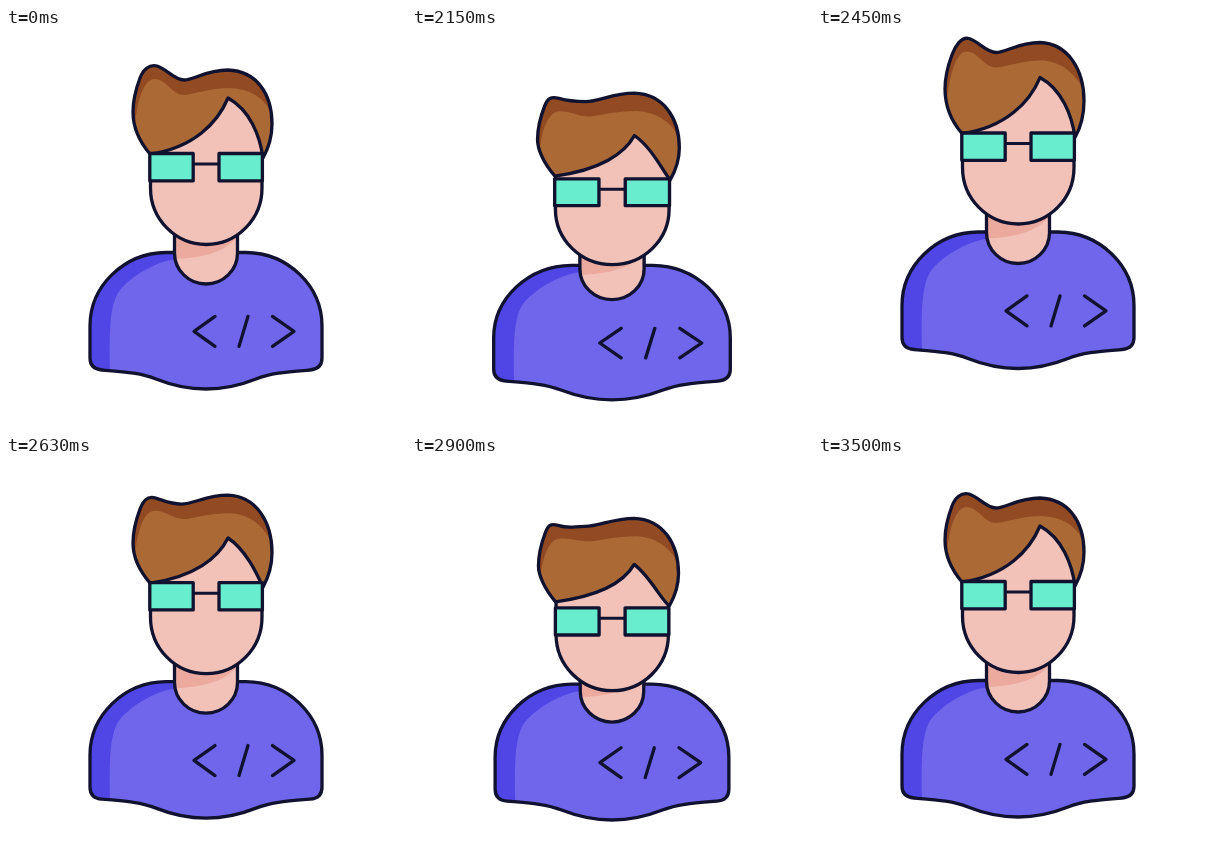
Animation, 400 px wide and 400 px high, one loop 3530 ms. Source, as an HTML page:

```html
<!DOCTYPE html>
<html lang="en">
<head>
<meta charset="utf-8">
<title>Developer hop</title>
<style>
html, body { margin: 0; width: 100%; height: 100%; overflow: hidden; background: #fff; }
svg { display: block; width: 100vw; height: 100vh; }
.line { fill: none; stroke: #11122f; stroke-width: 3.3; stroke-linecap: round; stroke-linejoin: round; }
</style>
</head>
<body>
<svg viewBox="0 0 400 400">
  <g id="figure">
    <path id="torso" fill="#7066ec"/>
    <path id="shade" fill="#5046e5"/>
    <path id="torsoLine" class="line"/>
    <path class="line" d="M209 288.4L188 303.3L209 318.4M242 288.4L233 318.4M266.5 288.4L288 303.3L266.5 318.4"/>
    <g id="neck">
      <path fill="#f2c2b9" d="M168.5 198V225A31.5 31 0 0 0 231.5 225V198Z"/>
      <path fill="#ecaa9f" d="M169 198H231V209C218 226 192 230 169 231Z"/>
      <path class="line" d="M168.5 198V225A31.5 31 0 0 0 231.5 225V198"/>
    </g>
    <g id="head">
      <path fill="#f2c2b9" d="M144.5 160V126L214 78L222 62L256 102V160A55.75 56.5 0 0 1 144.5 160Z"/>
      <path class="line" d="M144.5 126V160A55.75 56.5 0 0 0 256 160V128"/>
    </g>
    <path id="hairDark" fill="#914a22"/>
    <path id="hairLight" fill="#ab6936"/>
    <path id="hairLine" class="line"/>
    <g id="glasses" class="line">
      <path d="M187 136H213" stroke-width="3"/>
      <path fill="#68eece" d="M143.8 125.5H187.2V152.8H143.8ZM213 125.5H256.4V152.8H213Z"/>
    </g>
  </g>
</svg>
<script>
const LOOP = 3530, START = 2030, STEP = 30;
const el = id => document.getElementById(id);
const draw = (id, d) => el(id).setAttribute('d', d);
const shift = (id, y) => el(id).setAttribute('transform', `translate(0 ${y})`);

// parabolic arc: zero outside its span, height h in the middle
function arc(t, from, to, h) {
  const u = (t - from) / (to - from);
  return u > 0 && u < 1 ? 4 * h * u * (1 - u) : 0;
}

// crouch, hop, land, small hop, settle
const body = t => arc(t, 2008, 2270, 11) + arc(t, 2270, 2622, -20.5)
  + arc(t, 2622, 2922, 11) + arc(t, 2922, 3091, -8) + arc(t, 3091, 3280, 3);

// the head sinks after each crouch, the hair trails behind it
const sag = t => arc(t, 2050, 2350, 8.3) + arc(t, 2640, 2990, 19);
const fall = t => arc(t, 2040, 2380, 17) + arc(t, 2570, 3020, 23.5);
const lift = t => arc(t, 2200, 2720, -7) + arc(t, 2940, 3140, -4);

function hair(base, fringe, crown) {
  const f = fringe / 15;
  const top = base + crown, peak = top + fringe * .62, dip = top - fringe * .1;
  const left = base + fringe * .33 + crown * .4, right = base + fringe * .1 + crown * .4;
  const tip = base + fringe;
  const p = (x, y, d) => `${x.toFixed(2)} ${(y + d).toFixed(2)} `;
  const curve = (...pts) => 'C' + pts.map(a => p(...a)).join('');

  const root = [144, 126, base];
  const bangs = curve([266, 110, base], [262, 121, base], [257, 130, base])
    + curve([254 - 3 * f, 108, tip], [244 - 5 * f, 82, tip], [222, 70, tip])
    + curve([212, 94, base + fringe * .65], [188, 120, base], root) + 'Z';

  const outline = 'M' + p(...root)
    + curve([132, 112, base], [127, 98, base], [127, 84, left])
    + curve([127, 70, left], [131, 58, left], [134, 50, left])
    + curve([137, 42, left], [143 - 3 * f, 36, peak], [151 - 3 * f, 38, peak])
    + curve([161 - 3 * f, 41, peak], [168 - 5 * f, 52, dip], [178 - 4 * f, 52, dip])
    + curve([188, 52, dip], [200, 42, top], [222, 42, top])
    + curve([250, 43, top], [266, 65, right], [266, 96, right]) + bangs;

  const light = 'M' + p(...root)
    + curve([136, 116, base], [130, 104, base], [129, 95, left])
    + curve([131, 78, left], [136, 51, peak], [149, 51, peak])
    + curve([160, 51, peak], [166, 67, dip], [178, 67, dip])
    + curve([190, 66, dip], [203, 60, top], [224, 60, top])
    + curve([244, 61, top], [256, 69, right], [264, 82, right])
    + 'L' + p(266, 96, right) + bangs;

  draw('hairDark', outline);
  draw('hairLight', light);
  draw('hairLine', outline);
}

const sleeve = 'M168 224.5H160C118 225 84 258 84 298V330Q84 341 96 342';
const torso = sleeve + 'C120 344 135 345 150 351C165 357 180 361 200 361'
  + 'C220 361 235 357 250 351C265 345 280 344 304 342Q316 341 316 330V298C316 258 282 225 240 224.5H232';
draw('torso', torso + 'Z');
draw('torsoLine', torso);
draw('shade', sleeve + 'L104 342.6C103 300 104 275 114 262C128 246 150 234 170 231Z');

function render(ms) {
  const now = ms % LOOP;
  const t = now < START ? 0 : START + Math.floor((now - START) / STEP) * STEP;
  const squash = .0018 * Math.max(0, body(t - 10)), head = sag(t);
  el('figure').setAttribute('transform',
    `translate(200 ${361 + body(t)}) scale(${1 + squash} ${1 - squash * .7}) translate(-200 -361)`);
  shift('neck', head * .45);
  shift('head', head);
  shift('glasses', head * 1.53);
  hair(head * 1.08, fall(t), lift(t));
}

const began = performance.now();
function tick() {
  render(performance.now() - began);
  requestAnimationFrame(tick);
}
tick();
</script>
</body>
</html>
```
